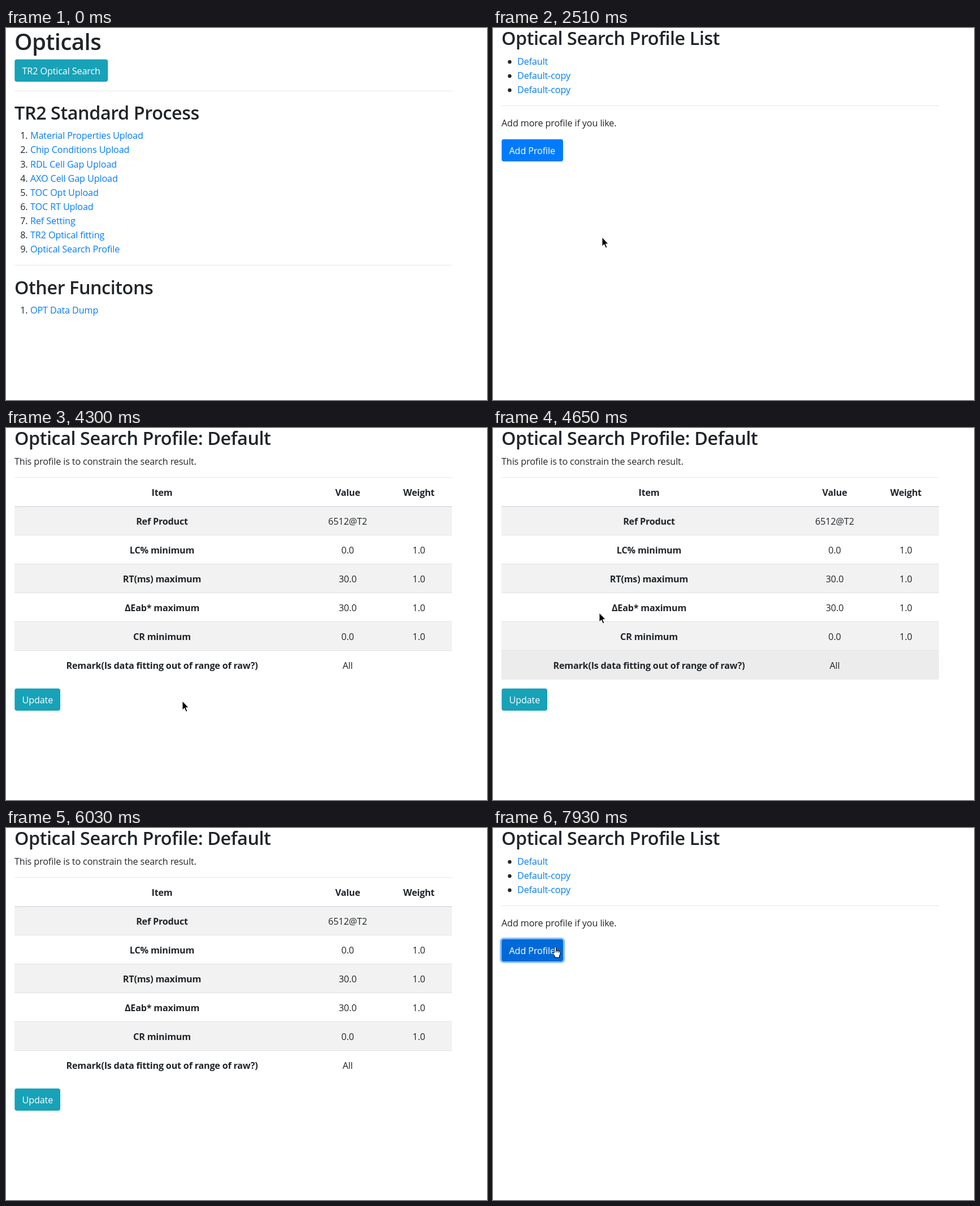
Write an HTML page with a canvas that moves like this. It is 851x658 px and loops after 8 s.

```html
<!DOCTYPE html>
<html lang="en">
<head>
<meta charset="utf-8">
<title>Optical search profiles</title>
<style>
  html, body { margin: 0; width: 100%; height: 100%; overflow: hidden; background: #fff; }
  canvas { display: block; }
</style>
</head>
<body>
<canvas id="stage" width="851" height="658"></canvas>
<script>
const ctx = document.getElementById('stage').getContext('2d');
const LOOP = 8000, STEP = 70;
const INK = '#212529', LINK = '#007bff', TEAL = '#17a2b8', DARK_TEAL = '#138496';

const easeIn = power => p => p ** power;
const easeOut = p => 1 - (1 - p) ** 2;

// Each move starts where the previous one ended, unless it enters from the edge
const MOVES = [
  { start: 120, end: 890, from: [492, 15], to: [222, 367], ease: easeOut },
  { start: 960, end: 1500, to: [174, 392], ease: easeOut },
  { start: 2230, end: 2990, to: [136, 77], bend: [258, 324], ease: easeIn(2) },
  { start: 3060, end: 3480, to: [79, 54], bend: [95, 30], ease: easeOut },
  { start: 3870, end: 4290, to: [312, 483], ease: easeOut },
  { start: 4360, end: 4640, to: [188, 327], ease: easeIn(2) },
  { start: 4720, end: 5280, to: [172, 111], ease: easeIn(2.6) },
  { start: 5610, end: 5960, to: [40, 106], bend: [150, 300], ease: easeIn(1) },
  { start: 7320, end: 7790, from: [0, 120], to: [110, 212], ease: easeOut }
];
MOVES.forEach((move, i) => {
  move.from ??= MOVES[i - 1].to;
  move.bend ??= move.from.map((v, axis) => (v + move.to[axis]) / 2);
});
const AWAY = { x: -99, y: -99 };
const CLICKS = [[1830, 1960], [3530, 3660], [7860, 7930]];

const STEPS = ['Material Properties Upload', 'Chip Conditions Upload', 'RDL Cell Gap Upload',
  'AXO Cell Gap Upload', 'TOC Opt Upload', 'TOC RT Upload', 'Ref Setting',
  'TR2 Optical fitting', 'Optical Search Profile'];
const ROWS = [['Ref Product', '6512@T2', ''], ['LC% minimum', '0.0', '1.0'],
  ['RT(ms) maximum', '30.0', '1.0'], ['ΔEab* maximum', '30.0', '1.0'],
  ['CR minimum', '0.0', '1.0'], ['Remark(Is data fitting out of range of raw?)', 'All', '']];
const COLUMNS = [276, 604.5, 730.5];

const ARROW = new Path2D('M0 0V16L3.7 12.6 6.4 18.8 8.9 17.8 6.3 11.7H11.2Z');
const HAND = new Path2D('M-1.5 8V-1Q0-2.8 1.5-1V4.2L7 5.2Q9 5.8 9 8V11L7.5 14V17H-.5V15L-4 10Q-4.5 7.5-1.5 8.5Z');
const KNUCKLES = new Path2D('M1.5 4V8M4 5V8M6.5 5.5V8.5');

let hover, overTarget;

// Pointer on a quadratic curve, refreshed once per step
function pointer(t) {
  const move = MOVES.findLast(m => m.start <= t);
  if (!move || (t >= 6030 && t < 7320)) return AWAY;
  const { start, end, from, bend, to, ease } = move;
  const snapped = start + Math.floor((t - start) / STEP) * STEP;
  const u = ease(Math.min(1, (snapped - start) / (end - start)));
  const [x, y] = from.map((v, i) =>
    v * (1 - u) ** 2 + 2 * bend[i] * u * (1 - u) + to[i] * u * u);
  return { x, y };
}

const hit = (x, y, w, h) =>
  hover.x >= x && hover.x <= x + w && hover.y >= y && hover.y <= y + h;

function rect(x, y, w, h, color) {
  ctx.fillStyle = color;
  ctx.fillRect(x, y, w, h);
}

function box(x, y, w, h, r, color) {
  ctx.fillStyle = color;
  ctx.beginPath();
  ctx.roundRect(x, y, w, h, r);
  ctx.fill();
}

function dot(x, y, r, color) {
  ctx.fillStyle = color;
  ctx.beginPath();
  ctx.arc(x, y, r, 0, 7);
  ctx.fill();
}

function setFont(size = 16.2, weight = 400) {
  ctx.font = `${weight} ${size}px "Open Sans", "Noto Sans", sans-serif`;
  ctx.letterSpacing = `${(weight === 400 ? -0.008 : -0.014) * size}px`;
}

function text(str, x, y, { size, weight, color = INK, align = 'left' } = {}) {
  setFont(size, weight);
  ctx.textAlign = align;
  ctx.fillStyle = color;
  ctx.fillText(str, x, Math.round(y));
}

const heading = (str, y, size = 32.4) => text(str, 15, y, { size, weight: 580 });
const rule = y => rect(15, y, 774, 1, '#e7e7e7');

function link(str, y) {
  setFont();
  const width = ctx.measureText(str).width;
  const over = hit(43, y - 18, width, 24);
  const color = over ? '#0056b3' : LINK;
  text(str, 43, y, { color });
  if (over) rect(43, Math.round(y) + 2, width, 1, color);
  overTarget ||= over;
}

function button(str, y, w, color, dark, focused) {
  const h = 39.3, over = hit(15, y, w, h);
  overTarget ||= over;
  if (focused) box(12, y - 3, w + 6.6, h + 6, 7, '#8ec3fb');
  box(15.3, y, w, h, 4, over ? dark : color);
  text(str, 28.5, y + 26.2, { color: '#fff' });
}

function numbered(items, y) {
  items.forEach((item, i) => {
    const base = y + i * 25.08;
    text(`${i + 1}.`, 38.5, base, { align: 'right' });
    link(item, base);
  });
}

function processPage() {
  heading('Opticals', 39, 40.2);
  button('TR2 Optical Search', 55.6, 165, TEAL, DARK_TEAL);
  rule(111);
  heading('TR2 Standard Process', 162);
  numbered(STEPS, 196.4);
  rule(419);
  heading('Other Funcitons', 471);
  numbered(['OPT Data Dump'], 504.5);
}

function listPage(t) {
  heading('Optical Search Profile List', 30);
  ['Default', 'Default-copy', 'Default-copy'].forEach((name, i) => {
    const y = 65 + i * 25;
    dot(29.5, y - 5, 3.2, INK);
    link(name, y);
  });
  rule(137);
  text('Add more profile if you like.', 15, 174);
  button('Add Profile', 196.7, 108.7, LINK, '#0069d9', t >= CLICKS[2][0]);
}

function profilePage() {
  heading('Optical Search Profile: Default', 30);
  text('This profile is to constrain the search result.', 15, 65);
  rect(15, 87, 774, 1, '#e6e8ea');
  ['Item', 'Value', 'Weight'].forEach((name, i) =>
    text(name, COLUMNS[i], 120, { weight: 700, align: 'center' }));
  ROWS.forEach((row, r) => {
    const top = Math.round(139 + r * 50.9);
    const over = hit(15, top, 774, 50);
    if (over || r % 2 === 0) rect(15, top, 774, 51, over ? '#ececec' : '#f2f2f2');
    rect(15, top - 1, 774, r ? 1 : 2, '#dee2e6');
    row.forEach((cell, i) =>
      text(cell, COLUMNS[i], 171 + r * 50.9, { weight: i ? 400 : 700, align: 'center' }));
  });
  button('Update', 460.7, 80.7, TEAL, DARK_TEAL);
}

function drawPointer({ x, y }, t) {
  if (CLICKS.some(([from, to]) => t >= from && t < to)) {
    dot(x, y + 1, 9.5, 'rgba(255, 245, 30, .65)');
  }
  const [shape, fill, line] = overTarget ? [HAND, '#fff', '#000'] : [ARROW, '#000', '#fff'];
  ctx.save();
  ctx.translate(x, y);
  ctx.fillStyle = fill;
  ctx.strokeStyle = line;
  ctx.fill(shape);
  ctx.stroke(shape);
  if (overTarget) ctx.stroke(KNUCKLES);
  ctx.restore();
}

function draw(now) {
  const t = now % LOOP;
  // Hover styles trail the pointer by one step
  hover = pointer(t - STEP);
  overTarget = false;
  rect(0, 0, 851, 658, '#fff');
  if (t < 2230) processPage();
  else if (t < 3870 || t >= 7040) listPage(t);
  else profilePage();
  drawPointer(pointer(t), t);
  requestAnimationFrame(draw);
}
requestAnimationFrame(draw);
</script>
</body>
</html>
```
